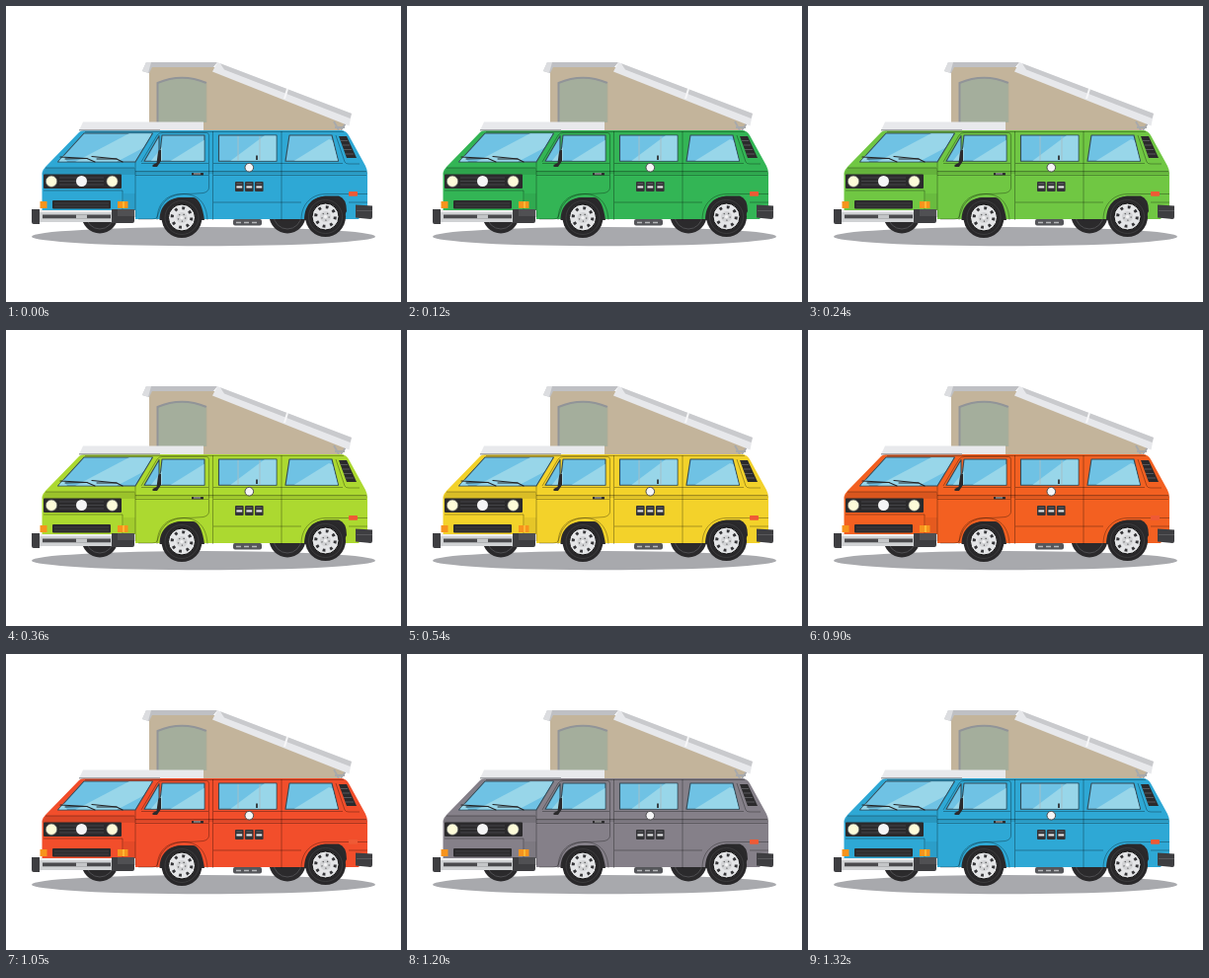
Write an HTML page that moves like this. It is 400 px wide and 300 px high and loops after 1350 ms.

```html
<!DOCTYPE html>
<html lang="en">
<head>
<meta charset="utf-8">
<title>Camper van</title>
<style>
  html, body { margin: 0; width: 100%; height: 100%; overflow: hidden; background: #fff; }
  svg { display: block; width: 100%; height: 100%; color: #2ea8d5; }
  .seam { fill: none; stroke: #000; stroke-opacity: .34; stroke-width: .9; }
  .glass { fill: #6fc2e4; stroke: #344b57; stroke-width: 1.1; stroke-linejoin: round; }
  .shine { fill: #98d6e9; }
  .dark { fill: #2b2a2c; }
</style>
</head>
<body>
<svg viewBox="0 0 400 300">
  <defs>
    <g id="wheel">
      <circle r="20.5" fill="#29282a"/>
      <circle r="17" fill="none" stroke="#414042" stroke-width=".8"/>
      <circle r="13.5" fill="#e4e5e7" stroke="#111" stroke-width="1"/>
      <circle r="9.8" fill="none" stroke="#353538" stroke-width="3" stroke-dasharray="2.8 4.897" />
      <circle r="5.6" fill="#d3d4d6"/>
      <circle r="3.7" fill="none" stroke="#58595b" stroke-width="1.3" stroke-dasharray="1.2 3.45"/>
      <circle r="1.7" fill="#f1f1f2"/>
    </g>
    <g id="box">
      <rect width="8.6" height="10" rx="1" fill="#343437"/>
      <rect x="1.4" y="4.4" width="5.8" height="2.1" fill="#e6e7e8"/>
      <path d="M1.5 2H7" stroke="#77787b" stroke-width=".7"/>
    </g>
    <clipPath id="screen"><path d="M53 157.5 79 129.3H147.5L130.5 157.5Z"/></clipPath>
    <clipPath id="side"><path d="M141 156.7 155 132.5V156.7ZM158 131.5H200.5V156.7H155.5ZM216 131.5H273.5V156.7H216ZM287 131.5H329.5L336 156.7H283.5Z"/></clipPath>
  </defs>

  <ellipse cx="200" cy="233.7" rx="174" ry="9.6" fill="#a8a9ad"/>

  <!-- Pop-up roof -->
  <path d="M145 62H211L344 119 338 126H145Z" fill="#c3b49b"/>
  <path d="M153.5 118V78Q178 67.500 203 78V118Z" fill="#a4ae9c"/>
  <path d="M153.500 118V78Q178 67.500 203 78" fill="none" stroke="#919498" stroke-width="2"/>
  <path d="M203 78V118" stroke="#b0ad99" stroke-width=".8"/>
  <path d="M332 117 337 126M344 119 339 126M333 123H343" fill="none" stroke="#a7a9ac" stroke-width="1.8"/>
  <path d="M142 57H214L210 62H148L145 68 138 66Z" fill="#bfc0c4"/>
  <path d="M138 66 142 57H147L144 68Z" fill="#dcdde0"/>
  <path d="M214 57 350 109 347.500 121.500 209 66.500Z" fill="#e7e8eb"/>
  <path d="M217 58.200 350 109 348.500 114 221 64.500Z" fill="#c9cacd"/>
  <path d="M285 84 282 94" stroke="#f7f7f8" stroke-width="2"/>

  <!-- Far wheels and step -->
  <g class="dark">
    <circle cx="95" cy="212" r="18.500"/>
    <circle cx="285" cy="212" r="18.500"/>
  </g>
  <g fill="none" stroke="#4d4d50">
    <circle cx="95" cy="212" r="14"/>
    <circle cx="285" cy="212" r="14"/>
  </g>
  <rect x="230" y="216" width="29" height="6.500" rx="2" fill="#55565a"/>
  <path d="M233 219.500H256" stroke="#b5b6b9" stroke-width="1.600" stroke-dasharray="5 3"/>

  <!-- Painted body -->
  <path d="M36.500 169Q37 166 40 163L74 128Q76 126 79 126H339Q344 126 347 131L364 162Q366 166 366 170V204L357 216H131V207H36.500Z" fill="currentColor"/>
  <path d="M40 164H131V167.500H366V170H131V171H36.500Z" fill="#000" opacity=".1"/>
  <path d="M119 190H131V207H119Z" fill="#000" opacity=".06"/>
  <g class="seam">
    <path d="M40 164H130M131 158V214M131 167.500H365M131 171.500H205M210 171.500H365"/>
    <path d="M209.500 127V217M279 127V217M210 199H299M347 199H366M80 127.500H342"/>
    <path d="M137 158 153 131Q155 128.500 158 128.500H203Q205.500 128.500 205.500 131V184Q205.500 188 200 189.500Q190 190.500 180 190.500Q164 191 157 203L153 214Q152 216 148 216H134"/>
    <path d="M153 217C153 199 164 190 180 190.500S203 201 204 217M299 217C299 200 310 190 326 190.500H366"/>
    <path d="M210 159.500H341M137 159.500H205M38 187H118V206"/>
    <path d="M334 131 343 158Q344 160 347 160H358"/>
  </g>

  <!-- Front roof panel -->
  <path d="M78 117.500H200V126H74Z" fill="#e8e9ec"/>
  <path d="M74 125.800H156" stroke="#a5a7ab" stroke-width="1.500"/>

  <!-- Windows -->
  <path class="glass" d="M52.500 158 79 129H148.500L131 158Z"/>
  <path class="shine" clip-path="url(#screen)" d="M70 158 125 129H150V138L112 158ZM53 158 58 151 62 158Z"/>
  <path class="glass" d="M140 157.200 155 131.500V157.200ZM158 131H201V157.200H155ZM215.500 131H274V157.200H215.500ZM287 131H330L336.500 157.200H283Z"/>
  <g clip-path="url(#side)" class="shine">
    <path d="M146 158 158 143V158ZM165 158 202 135V158ZM226 158 262 131H275V158ZM290 158 327 135 340 140V158Z"/>
  </g>
  <path d="M235 132V157M257 132V157" stroke="#a3bfc8" stroke-width="1"/>
  <path d="M254 151.500V156" stroke="#29282a" stroke-width="1.700"/>
  <g fill="none" stroke="#242426" stroke-linecap="round">
    <path d="M55 153 82 154.500 90 158M87 152.500 112 155 118 158" stroke-width="1.200"/>
    <path d="M60 155 82 154.500M92 155 112 155" stroke-width="1"/>
  </g>
  <path d="M154 148Q154 146 156 146H157V157L153 163H148.500V161L152.500 159Z" class="dark"/>

  <!-- Front end -->
  <rect class="dark" x="38" y="170.500" width="79" height="14.500" rx="1"/>
  <path d="M54 174H99M54 177.500H99M54 181H99" stroke="#4b4b4e" stroke-width=".8"/>
  <g fill="#fdfbd9" stroke="#58595b" stroke-width=".7">
    <circle cx="46" cy="177.700" r="5.700"/>
    <circle cx="107.500" cy="177.700" r="5.700"/>
  </g>
  <circle cx="76.500" cy="177.500" r="5.500" fill="#f5f5f6"/>
  <rect class="dark" x="47" y="197" width="59" height="8.500" rx="1"/>
  <path d="M49 200H104M49 203H104" stroke="#48484b" stroke-width=".7"/>
  <g fill="#f7941d">
    <rect x="34.500" y="198" width="7" height="7"/>
    <rect x="113" y="198" width="10.500" height="7"/>
  </g>
  <path d="M119 198V205" stroke="#fdb833" stroke-width="2"/>
  <rect x="33" y="207" width="75" height="12" fill="#d0d2d4"/>
  <path d="M34 208H108" stroke="#efeff0" stroke-width="2"/>
  <rect x="37" y="211.500" width="69" height="3.800" fill="#4b4b4e"/>
  <rect x="71" y="211.500" width="11" height="3.800" fill="#c4c6c8"/>
  <path d="M26 206H34V221H28Q26 221 26 219ZM107 206H130V218Q130 220 128 220H107Z" fill="#3e3e41"/>
  <path d="M113 206H130V213H113Z" fill="#505053"/>

  <!-- Side details -->
  <path d="M188 170.300H200" stroke="#2b2a2c" stroke-width="2.400"/>
  <path d="M190 170H197" stroke="#d6d7d9" stroke-width=".9"/>
  <circle cx="246.300" cy="163.700" r="4.300" fill="#f5f5f6" stroke="#4d4d50" stroke-width="1"/>
  <use href="#box" x="232" y="178"/>
  <use href="#box" x="242" y="178"/>
  <use href="#box" x="252" y="178"/>
  <path class="dark" d="M337 132H345L355 154H345Z"/>
  <path d="M339 136.500H346M340.500 141H348M342 145.500H350M343.500 150H352" stroke="#5d5d60" stroke-width=".9"/>
  <rect x="347" y="188" width="9" height="4.800" rx=".8" fill="#ef5a35"/>
  <path d="M354 201.500 371 202.500V214Q371 216 369 216L354 214.500Z" fill="#3e3e41"/>
  <path d="M355 207.500H371" stroke="#59595c"/>

  <!-- Near wheels -->
  <path class="dark" d="M155.500 217C156 202 164 194 180 194H190Q198 196 201 217ZM302 217C302 202 310 192.500 326 192.500H337Q345 195 345 208L340 217Z"/>
  <use href="#wheel" x="178" y="214.500"/>
  <use href="#wheel" x="323.500" y="213.500"/>
</svg>
<script>
  const LOOP = 1350, STEP = 30;
  const paints = [
    [0, 46, 168, 213],
    [120, 51, 181, 85],
    [360, 172, 217, 48],
    [540, 243, 210, 42],
    [750, 244, 114, 22],
    [1050, 242, 78, 43],
    [1320, 46, 168, 213],
    [LOOP, 46, 168, 213]
  ];
  const svg = document.querySelector("svg");

  function paintAt(time) {
    const next = paints.findIndex(p => p[0] > time);
    const [a, b] = [paints[next - 1], paints[next]];
    const mix = (time - a[0]) / (b[0] - a[0]);
    const rgb = [1, 2, 3].map(i => Math.round(a[i] + (b[i] - a[i]) * mix));
    return `rgb(${rgb})`;
  }

  function draw() {
    const time = performance.now() % LOOP;
    svg.style.color = paintAt(Math.floor(time / STEP) * STEP);
    requestAnimationFrame(draw);
  }
  draw();
</script>
</body>
</html>
```
